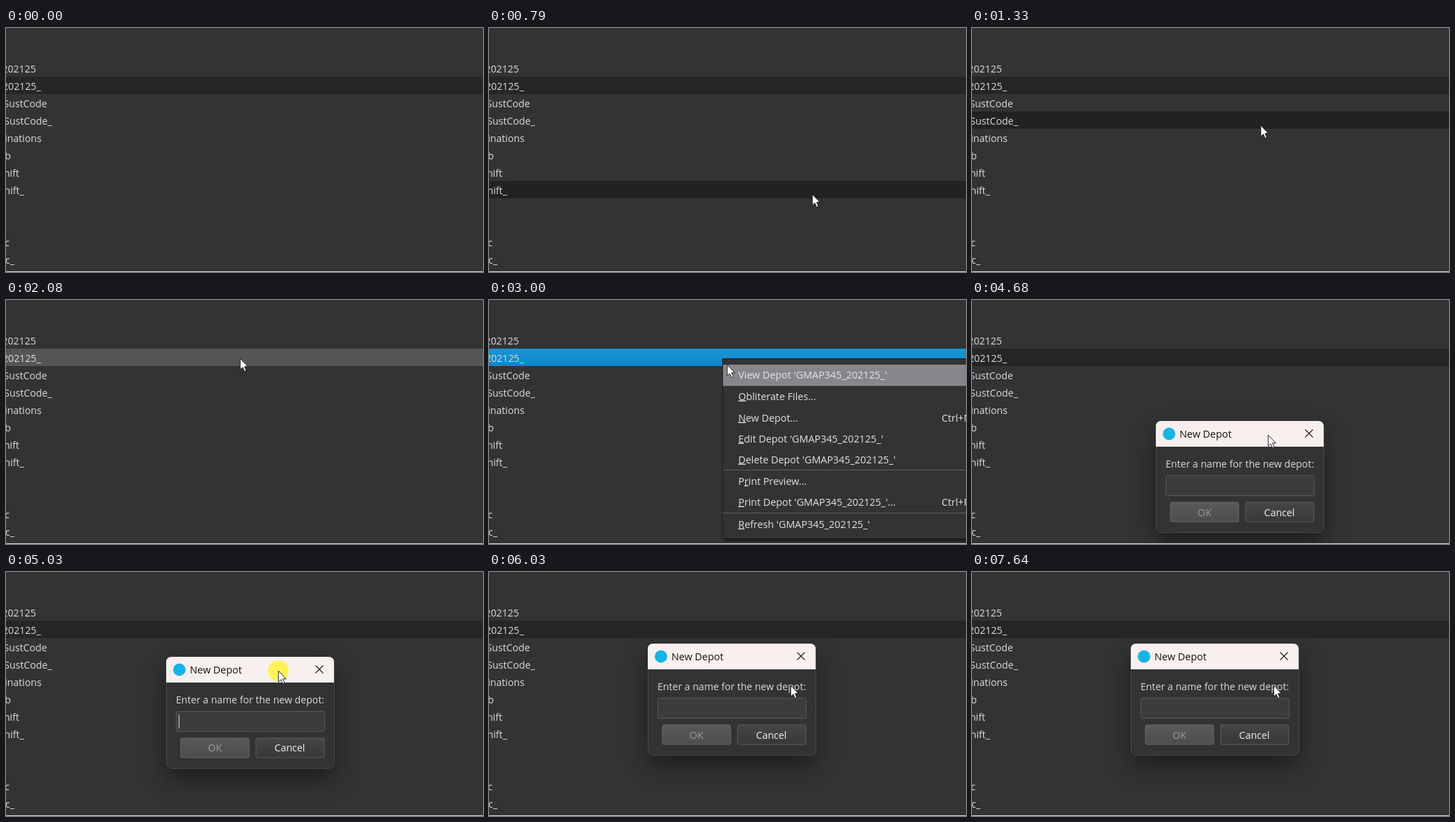
An HTML page for the animation above (8 s loop, 685x351 px).

```html
<!DOCTYPE html>
<html>
<head>
<meta charset="utf-8">
<style>
  html, body { margin: 0; height: 100%; overflow: hidden; background: #333; }
  svg { display: block; width: 685px; height: 351px; }
  text { font: 14.2px "Open Sans", "Noto Sans", sans-serif; fill: #dcdcdc; white-space: pre; }
  .menu text { font-size: 14.35px; fill: #e4e4e4; }
  .menu .box { filter: drop-shadow(3px 3px 1px rgba(0, 0, 0, .45)); }
  .shade { filter: drop-shadow(0 16px 17px rgba(0, 0, 0, .42)); }
  u, .key { text-decoration: underline; }
</style>
</head>
<body>
<svg viewBox="0 0 685 351">
  <defs>
    <linearGradient id="blue" x2="0" y2="1"><stop stop-color="#1b95d6"/><stop offset="1" stop-color="#0a87c9"/></linearGradient>
    <linearGradient id="plain" x2="0" y2="1"><stop stop-color="#464646"/><stop offset="1" stop-color="#383838"/></linearGradient>
    <linearGradient id="dim" x2="0" y2="1"><stop stop-color="#5a5a5a"/><stop offset="1" stop-color="#4d4d4d"/></linearGradient>
  </defs>
  <rect width="685" height="351" fill="#333"/>
  <rect id="chosen" y="70" width="685" height="25"/>
  <rect id="hover" width="685" height="25" fill="#222"/>
  <g id="list"></g>

  <g id="menu" class="menu">
    <rect class="box" x="335.5" y="84.5" width="370" height="259" fill="#333" stroke="#1c1c1c"/>
    <rect id="item" x="336" width="349" height="30" fill="#87878b"/>
    <path d="M336 123.5H685M336 244.5H685M336 306.5H685" stroke="#606060"/>
    <g id="items"></g>
  </g>

  <g id="dialog">
    <rect class="shade" width="241" height="160" rx="8" fill="#333"/>
    <rect x=".5" y=".5" width="241" height="160" rx="8" fill="#333" stroke="#4a4a4a"/>
    <path d="M0 37V8Q0 0 8 0H233Q241 0 241 8V37Z" fill="#f8f0ee"/>
    <circle cx="19" cy="18.5" r="9" fill="#17b3e6"/>
    <text x="34" y="24" style="font-size:14.4px;fill:#111">New Depot</text>
    <path d="M214.5 12.5l11 11m0-11l-11 11" stroke="#222" stroke-width="1.3"/>
    <text x="14" y="67" style="font-size:14.13px">Enter a name for the new depot:</text>
    <rect x="14.5" y="78.5" width="213" height="29" rx="2" fill="#3c3c3c" stroke="#585858"/>
    <rect id="caret" x="18" y="83" width="1" height="20" fill="#ddd"/>
    <rect x="21" y="117" width="98" height="28" rx="2" fill="url(#dim)" stroke="#686868"/>
    <text x="70" y="136.5" text-anchor="middle" style="fill:#9a9a9a">OK</text>
    <rect x="129" y="117" width="98" height="28" rx="2" fill="url(#plain)" stroke="#5c5c5c"/>
    <text x="177.5" y="136.5" text-anchor="middle" style="fill:#f2f2f2">Cancel</text>
  </g>

  <rect y="350" width="685" height="1" fill="#dedede"/>
  <circle id="press" r="15" fill="#fff500" opacity=".62"/>
  <path id="cursor" d="M.3 .3V16.2L3.9 12.8L6.5 18.7L9 17.6L6.5 11.8H11.3Z" fill="#fff" stroke="#111" stroke-width=".9"/>
</svg>
<script>
const $ = id => document.getElementById(id);
const LOOP = 8000;

// name, right edge, middle line
const rows = [
  ["GMAP345_202125", 43, 58], ["GMAP345_202125_", 50, 83], ["SustCode", 59, 108], ["SustCode_", 66, 133],
  ["Combinations", 51, 158], ["Web", 7, 183], ["Shift", 19, 208], ["Shift_", 26, 233], ["Doc", 5, 308], ["Doc_", 12, 333]
];
$("list").innerHTML = rows.map(([name, x, y]) =>
  `<text x="${x}" y="${y + 5.5}" text-anchor="end">${name}</text>`).join("");

// the letter after & is underlined
const depot = "'GMAP345_202125_'";
const items = [
  [`View Depot ${depot}`, 107], ["&Obliterate Files...", 138], ["&New Depot...", 169, "Ctrl+N"],
  [`&Edit Depot ${depot}`, 199], [`&Delete Depot ${depot}`, 229], ["P&rint Preview...", 260],
  [`&Print Depot ${depot}...`, 290, "Ctrl+P"], [`&Refresh ${depot}`, 322]
];
$("items").innerHTML = items.map(([label, y, keys = ""]) =>
  `<text x="358" y="${y + 5.5}">${label.replace(/&(.)/, '<tspan class="key">$1</tspan>')}</text>` +
  `<text x="650" y="${y + 5.5}">${keys}</text>`).join("");

// time, x, y of the pointer
const path = [
  [310, 540, 352], [790, 464, 239], [940, 428, 148], [1190, 428, 148], [1740, 345, 98],
  [2010, 345, 98], [2080, 336, 84], [2870, 336, 84], [3480, 385, 160], [3950, 385, 160],
  [4550, 425, 194], [4690, 425, 194], [5030, 391, 142], [5230, 389, 123], [5490, 389, 123], [6030, 433, 163]
];
const presses = [[2410, 2560], [3790, 3960], [4720, 5490]];

const clamp = (v, lo = 0, hi = 1) => Math.min(hi, Math.max(lo, v));
const ramp = (t, a, b) => clamp((t - a) / (b - a));
const show = (id, on) => $(id).setAttribute("visibility", on ? "visible" : "hidden");
const move = (id, x, y, s = 1) => $(id).setAttribute("transform", `translate(${x} ${y}) scale(${s})`);

function pointer(t) {
  const i = clamp(path.findIndex(p => p[0] > t), 1, path.length - 1);
  const [a, b] = t >= path.at(-1)[0] ? [path.at(-1), path.at(-1)] : [path[i - 1], path[i]];
  const k = a === b ? 0 : ramp(t, a[0], b[0]);
  const e = k * k * (3 - 2 * k);
  return [a[1] + (b[1] - a[1]) * e, a[2] + (b[2] - a[2]) * e];
}

function draw(t) {
  const [x, y] = pointer(t);
  move("cursor", x, y);
  show("cursor", t >= 310);
  move("press", x, y);
  show("press", presses.some(([a, b]) => t >= a && t < b));

  const top = Math.floor((y - 20) / 25) * 25 + 20;
  const over = t >= 310 && t < 2410;
  $("hover").setAttribute("y", top);
  show("hover", over && top !== 70);
  $("chosen").setAttribute("fill",
    t >= 2410 && t < 3950 ? "url(#blue)" : over && top === 70 ? "#555" : "#262626");

  $("menu").setAttribute("opacity", ramp(t, 2450, 2600) * (1 - ramp(t, 3880, 4000)));
  const n = Math.floor((y - 93) / 30.5);
  $("item").setAttribute("y", 93 + 30.5 * n);
  $("item").setAttribute("opacity", n >= 0 ? 1 : 0);

  const open = ramp(t, 4080, 4330);
  const size = 1 - .1 * (1 - open) ** 3;
  const [px, py] = pointer(clamp(t, 4620, 5490));
  $("dialog").setAttribute("opacity", open);
  move("dialog", px - 161 + 120 * (1 - size), py - 20 + 80 * (1 - size), size);
  $("caret").setAttribute("opacity", Math.floor((t - 4990) / 530) % 2 ? 0 : 1);
}

const start = performance.now();
(function tick() {
  draw((performance.now() - start) % LOOP);
  requestAnimationFrame(tick);
})();
</script>
</body>
</html>
```
